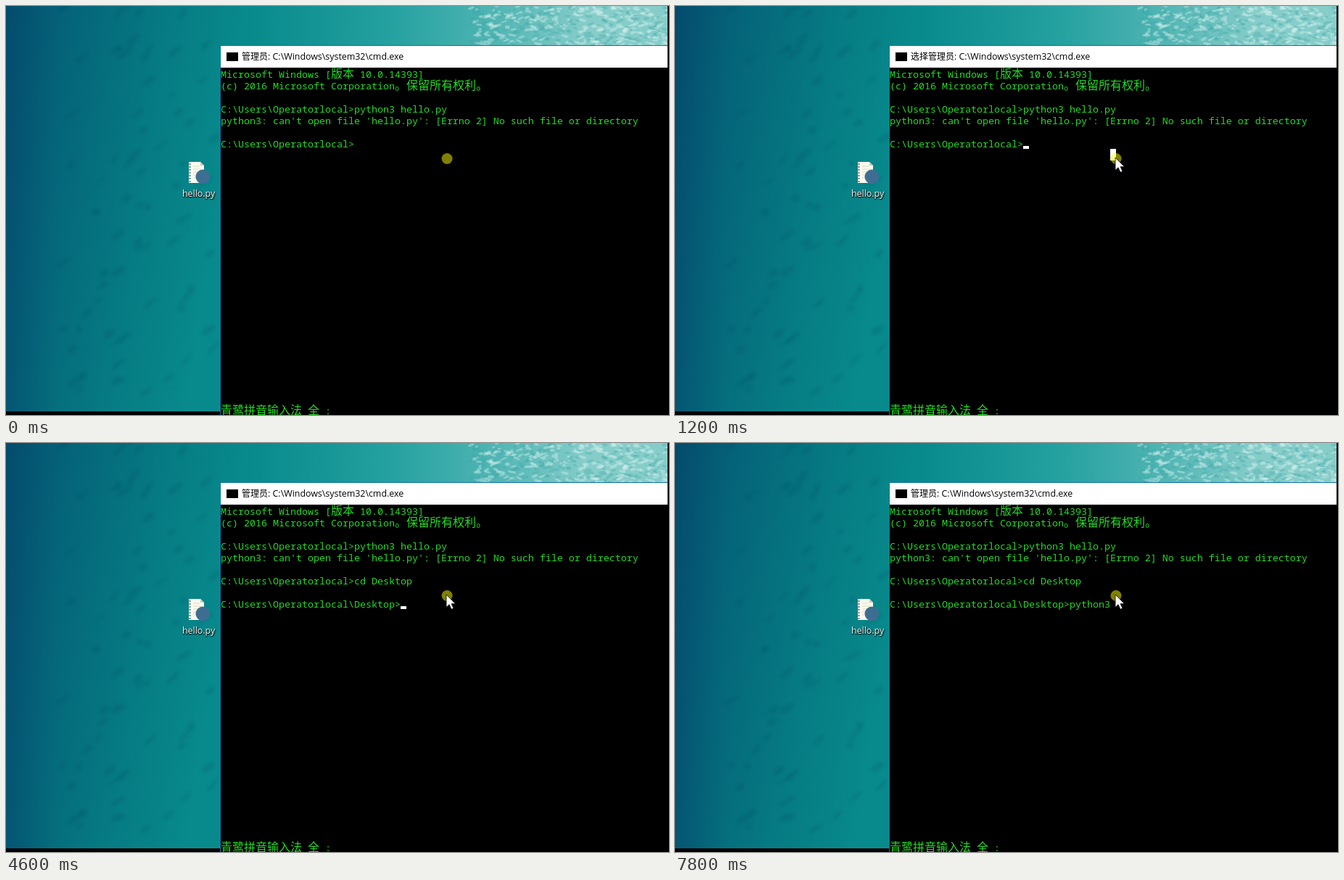
Animation of 914x564 px, one loop 8 s. Source, as an HTML page with a canvas:

```html
<!DOCTYPE html>
<html lang="zh-CN">
<head>
<meta charset="utf-8">
<title>Console</title>
<style>
html, body { margin: 0; width: 100%; height: 100%; overflow: hidden; background: #000; }
canvas, svg { position: absolute; left: 0; top: 0; width: 914px; height: 564px; }
text { white-space: pre; }
#console text {
  font: 300 13.333px "Noto Sans Mono", "Liberation Mono", monospace;
  fill: #22dc22;
}
#console .cn { font: 300 16px "Noto Sans CJK SC", "Noto Sans CJK JP", sans-serif; }
.ui { font: 12.4px "Open Sans", "Noto Sans", sans-serif; }
.ui .cn { font: 12px "Noto Sans CJK SC", "Noto Sans CJK JP", sans-serif; }
.label { fill: #fff; text-shadow: 1px 1px 2px #000, 0 1px 1px #000; }
</style>
</head>
<body>
<canvas id="sea" width="914" height="564"></canvas>
<svg viewBox="0 0 914 564">
  <!-- desktop icon -->
  <path d="M252 215h16l5 5v24h-21z" fill="#fbfaf0"/>
  <path d="M268 215v5h5z" fill="#c9c9bc"/>
  <path d="M253.500 217v26" stroke="#6f7a70" stroke-width="2" stroke-dasharray="2 2"/>
  <path d="M258 221h9M258 225h12M258 229h12M258 233h12M258 237h12" stroke="#dedcc4"/>
  <circle cx="271.500" cy="235.500" r="10" fill="#3d6e92"/>
  <text class="ui label" x="243" y="262.500">hello.py</text>

  <!-- console window -->
  <rect x="295" y="54" width="617" height="510" fill="#0a74a8"/>
  <rect x="296" y="85" width="618" height="479"/>
  <rect x="296" y="55" width="616" height="30" fill="#fff"/>
  <rect x="304" y="64" width="16" height="12"/>
  <text class="ui" x="325" y="74"><tspan class="cn" id="title"></tspan>: C:\Windows\system32\cmd.exe</text>
  <g id="console"></g>

  <rect id="cell" x="600" y="197" width="8" height="16" fill="#fff"/>
  <rect id="caret" width="8" height="4" fill="#fff"/>
  <circle cx="608" cy="210.500" r="7.500" fill="#ff0" fill-opacity=".5"/>
  <path id="arrow" d="M607 209v17.500l4-3.700 3 6.500 3-1.300-2.900-6.300h5.400z" fill="#fff" stroke="#000" stroke-width=".8"/>
  <circle id="ring" cx="607.500" cy="210.500" r="20" fill="none" stroke="#f00f14" stroke-width="2.800"/>
</svg>
<script>
const LOOP = 8000, LEFT = 296, CHAR = 8, ROW = 16;
const $ = id => document.getElementById(id);
const home = "C:\\Users\\Operatorlocal";

function paintSea() {
  const g = $("sea").getContext("2d");
  let seed = 11;
  const rnd = () => (seed = seed * 16807 % 2147483647) / 2147483647;
  const wash = (x1, y1, x2, y2, stops, box) => {
    const grad = g.createLinearGradient(x1, y1, x2, y2);
    stops.forEach(([at, color]) => grad.addColorStop(at, color));
    g.fillStyle = grad;
    g.fillRect(...box);
  };
  const blob = (x, y, rx, ry, turn, color) => {
    g.fillStyle = color;
    g.beginPath();
    g.ellipse(x, y, rx, ry, turn, 0, 7);
    g.fill();
  };
  g.beginPath();
  g.rect(0, 0, 912, 559);
  g.clip();
  wash(0, 0, 330, 50, [[0, "#045270"], [.3, "#05667a"], [.65, "#067a82"], [1, "#088a8c"]], [0, 0, 912, 559]);
  wash(0, 0, 70, 0, [[0, "rgba(4,65,105,.4)"], [1, "rgba(4,75,105,0)"]], [0, 0, 70, 559]);
  wash(340, 0, 800, 0, [[0, "rgba(50,170,168,0)"], [.4, "rgba(50,172,170,.65)"], [1, "#86cdca"]], [340, 0, 572, 55]);

  // soft ripples and foam
  g.filter = "blur(2px)";
  for (let i = 0; i < 75; i++) {
    const y = rnd() * 559, x = 75 + rnd() * 215;
    blob(x, y, 4 + rnd() * 9, 1.5 + rnd() * 3, -.9 + rnd() * .4, "rgba(0,60,85,.14)");
  }
  g.filter = "blur(.6px)";
  for (let i = 0; i < 420; i++) {
    const x = 640 + rnd() * 275, y = rnd() * 55;
    const color = rnd() < .55 ? "rgba(215,242,240,.4)" : "rgba(60,165,165,.3)";
    blob(x, y, 2 + rnd() * 4, 1 + rnd() * 1.5, -.5 + rnd(), color);
  }
}

// Chinese runs get the full-width face
function addLine(row, str = "") {
  const line = document.createElementNS("http://www.w3.org/2000/svg", "text");
  line.setAttribute("x", LEFT);
  line.setAttribute("y", 99 + row * ROW);
  line.innerHTML = str.replace(/[\u3000-\u9fff]+/g, '<tspan class="cn">$&</tspan>');
  $("console").append(line);
  return line;
}

addLine(0, "Microsoft Windows [版本 10.0.14393]");
addLine(1, "(c) 2016 Microsoft Corporation。保留所有权利。");
addLine(3, home + "&gt;python3 hello.py");
addLine(4, "python3: can't open file 'hello.py': [Errno 2] No such file or directory");
addLine(29, "青鹭拼音输入法 全 :");

const prompts = [
  { row: 6, from: 0, lead: home + ">", keys: "cd Desktop",
    at: [2000, 2200, 2600, 2800, 3000, 3200, 3400, 3600, 4000, 4200] },
  { row: 8, from: 4400, lead: home + "\\Desktop>", keys: "python3 ",
    at: [6200, 6400, 6600, 6800, 7000, 7200, 7400, 7800] }
];
prompts.forEach(p => p.line = addLine(p.row));

const blinks = [[800, 2000], [2600, 3000], [3600, 4000], [4400, 5000], [5600, 6200], [6600, 7200]];
const within = (t, [a, b]) => t >= a && t < b;
const show = (id, on) => $(id).setAttribute("visibility", on ? "visible" : "hidden");

function draw(t) {
  for (const p of prompts) {
    const typed = p.at.filter(ms => ms <= t).length;
    const str = t >= p.from ? p.lead + p.keys.slice(0, typed) : "";
    if (p.line.textContent !== str) p.line.textContent = str;
    if (str) {
      $("caret").setAttribute("x", LEFT + str.length * CHAR);
      $("caret").setAttribute("y", 97 + p.row * ROW);
    }
  }
  show("caret", blinks.some(b => within(t, b)));
  show("arrow", t >= 200);
  show("ring", within(t, [400, 800]));
  show("cell", within(t, [400, 1400]));
  $("title").textContent = within(t, [800, 1400]) ? "选择管理员" : "管理员";
}

paintSea();
const start = performance.now();
function tick() {
  draw((performance.now() - start) % LOOP);
  requestAnimationFrame(tick);
}
tick();
</script>
</body>
</html>
```
